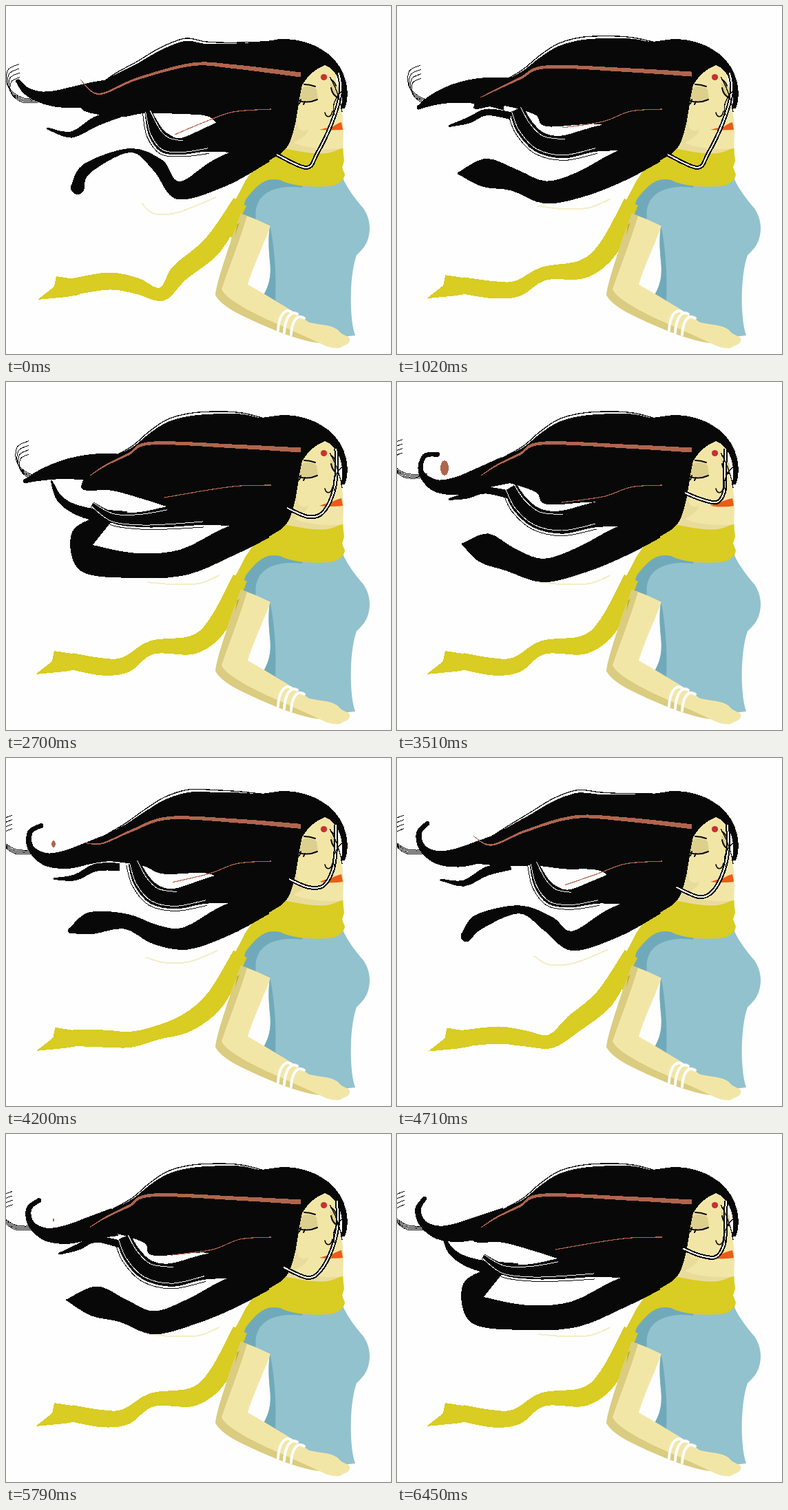
These frames come from a looping animation (559x506 px, 6.55 s). An HTML page:

```html
<!DOCTYPE html>
<html lang="en">
<head>
<meta charset="utf-8">
<title>Hair in the wind</title>
<style>
html, body { margin: 0; width: 100%; height: 100%; overflow: hidden; background: #fefefe; }
svg { display: block; width: 559px; height: 506px; }
.line { fill: none; stroke: #080808; stroke-linecap: round; }
</style>
</head>
<body>
<svg viewBox="0 0 559 506">
  <!-- torso -->
  <path d="M342 304C346 280 354 262 372 252L390 235H488L490 252C496 266 509 283 518 293C526 304 530 318 527 333C525 347 515 357 509 362C501 385 500 420 501 440C502 460 504 470 507 479L490 481L440 462L373 422C381 408 386 395 383 370C381 350 381 335 383 320Z" fill="#91c2ce"/>
  <path d="M342 304C346 280 354 262 372 250L430 255V264C398 260 376 268 367 284C362 293 362 302 363 312Z" fill="#70aaba"/>
  <path d="M383 318C390 350 393 395 391 432L373 422C381 408 386 395 383 370C381 350 381 335 383 320Z" fill="#70aaba"/>
  <!-- face and neck -->
  <path d="M463 84L479 97C481 112 480 133 486 150C490 160 489 170 490 182L489 215L450 220L404 213L418 150L424 105Z" fill="#f2e6a7"/>
  <path d="M424 158C419 174 427 187 439 179C437 190 425 194 418 199C435 207 470 210 490 207L489 217L404 214Z" fill="#e9dc9b"/>
  <path d="M430 118Q444 115 451 121L453 136Q439 141 426 135ZM470 112L483 118V133Q474 128 470 112Z" fill="#ddcf8d"/>
  <g class="line" stroke-width="2">
    <path d="M433 114Q441 114 449 117M472 107Q477 110 479 116"/>
    <path d="M426 138Q439 142 452 136M428 136L426 142M434 139L432 143M472 119Q474 130 482 133"/>
    <path d="M463 155C465 163 472 163 474 153" stroke-width="1.6"/>
  </g>
  <circle cx="461.500" cy="103.500" r="4.600" fill="#c9302b"/>
  <path id="lips" fill="#ec5a17"/>
  <!-- scarf -->
  <path d="M384 204C412 208 445 217 466 214C478 212 484 207 489 207L491 225L488 235L492 245C490 256 480 261 468 262C445 264 415 262 398 253C376 248 364 262 353 275C344 284 342 300 338 318L330 341L315 318C325 295 337 276 347 255C358 238 370 222 384 204Z" fill="#d9cc22"/>
  <g shape-rendering="crispEdges" fill="#d9cc22"><path id="scarf"/><path id="scarfEnd"/></g>
  <!-- arm and bangles -->
  <path d="M341 302Q360 308 384 320C375 345 359 378 351 405L377 420L410 440L440 460C456 464 472 463 482 471C489 481 501 479 499 486C499 493 489 493 485 497C475 499 465 495 455 490C425 487 380 468 345 451C328 443 310 432 304 420C306 402 319 365 327 340Z" fill="#f2e6a7"/>
  <path d="M341 302L350 305C338 345 322 385 313 412C320 428 365 450 400 465L440 483L455 490C425 487 380 468 345 451C328 443 310 432 304 420C306 402 319 365 327 340Z" fill="#dacc80"/>
  <path d="M339 315L333 333L335 318Z" fill="#c2b32a"/>
  <path d="M395 472C396 450 405 439 414 445M404 475C405 453 414 442 423 448M414 478C415 458 423 447 433 454" fill="none" stroke="#fefefe" stroke-width="4" stroke-linecap="round"/>
  <g id="hair" shape-rendering="crispEdges"></g>
</svg>
<script>
const INK = '#080808', BROWN = '#b0654d', PAPER = '#fefefe';

// The wind over time: sway moves every lock, curl rolls the tip, fall drops the fringe.
const WIND = [
  { at: 0, sway: 0, curl: 0.4, fall: 1 },
  { at: 1020, sway: 0.7, curl: 0, fall: 1 },
  { at: 2700, sway: 1, curl: 0.05, fall: 0.4 },
  { at: 3510, sway: 0.78, curl: 1, fall: 0 },
  { at: 4710, sway: 0.15, curl: 0.8, fall: 0.5 },
  { at: 5790, sway: 0.75, curl: 0.85, fall: 0.6 },
  { at: 6450, sway: 1, curl: 0.75, fall: 0.1 }
];

const shape = (text, n = 2) => {
  const v = text.split(' ').map(Number);
  return Array.from({ length: v.length / n }, (_, i) => v.slice(i * n, i * n + n));
};

// Key shapes for rest, gust and full gust; the last one holds.
const CROWN = [
  shape('375 52 325 55 290 55 260 51 225 64 190 84 160 99 130 118'),
  shape('375 53 345 47 315 46 270 49 235 58 208 75 180 97 130 122')
];
const UNDER = [
  shape('110 150 165 161 200 156 250 157 300 164'),
  shape('112 149 150 143 200 158 214 177 300 174'),
  shape('110 155 155 158 205 172 250 185 310 190')
];
const LOW = [
  shape('375 210 36 310 243 42 250 268 26 221 232 20 180 210 6 118 236 16 104 264 20', 3),
  shape('375 210 36 325 232 44 270 258 38 215 275 34 170 258 34 128 243 44 88 241 2', 3),
  shape('375 210 36 322 233 42 258 262 38 190 267 36 118 256 42 112 226 36 150 196 14', 3)
];
const MID = [
  shape('340 185 60 290 195 34 255 204 24 232 200 28 217 183 22 206 153 10', 3),
  shape('335 188 44 285 194 36 240 205 34 205 198 30 182 175 27 170 150 22', 3),
  shape('335 185 50 285 190 36 235 196 30 195 200 22 155 197 16 125 178 8', 3)
];
const SIDE = [
  shape('165 156 12 130 168 14 95 187 9 60 178 3', 3),
  shape('165 160 11 130 153 9 105 164 9 78 174 3', 3),
  shape('175 198 20 115 190 16 80 172 10 66 144 3', 3)
];
const SHINE = [
  shape('428 100 330 88 270 85 190 106 135 128 108 107'),
  shape('428 99 340 94 212 89 178 105 145 121 122 136')
];
const GLINT = [
  shape('385 150 330 154 290 168 245 187'),
  shape('385 150 340 153 300 168 240 176'),
  shape('385 150 340 151 300 156 230 168')
];
const SCARF = [
  shape('340 285 300 348 252 388 226 419 190 407 150 400 98 408'),
  shape('340 285 308 352 272 382 212 386 174 411 140 414 95 406')
];
const WISP = [
  shape('197 287 215 302 250 300 305 278'),
  shape('205 291 240 294 280 293 310 281')
];
const FRINGE = [
  shape('477 97 476 135 475 160 464 175 440 170 418 161'),
  shape('483 97 486 125 473 170 452 214 436 235 393 216')
];
const NAPE = shape('322 208 372 226 398 212 415 185 422 140 420 90 410 50');
const SCARF_W = [22, 29, 27, 20, 23, 25, 24];
const SCARF_TIP = shape('-25 -15 -28 0 -52 19 -10 15');

const $ = id => document.getElementById(id);
const set = (node, d) => node.setAttribute('d', d);
const lerp = (a, b, u) => a + (b - a) * u;
const fix = v => v.toFixed(1);
const mixShapes = (a, b, u) => a.map((p, i) => p.map((v, k) => lerp(v, b[i][k], u)));

function pose(keys, sway) {
  const u = Math.min(keys.length - 1, sway < 0.75 ? sway / 0.75 : 1 + (sway - 0.75) * 4);
  const i = Math.min(keys.length - 2, Math.floor(u));
  return mixShapes(keys[i], keys[i + 1], u - i);
}

function spline(p, closed, start = 'M') {
  const n = p.length;
  const at = i => closed ? p[(i + n) % n] : p[Math.max(0, Math.min(n - 1, i))];
  let d = start + fix(p[0][0]) + ' ' + fix(p[0][1]);
  for (let i = 0; i < (closed ? n : n - 1); i++) {
    const [a, b, c, e] = [at(i - 1), at(i), at(i + 1), at(i + 2)];
    const q = [0, 1].map(k => b[k] + (c[k] - a[k]) / 6);
    const r = [0, 1].map(k => c[k] - (e[k] - b[k]) / 6);
    d += 'C' + [...q, ...r, c[0], c[1]].map(fix).join(' ');
  }
  return d + (closed ? 'Z' : '');
}

// Runs beside the centre line; k = 0.5 is the edge.
function beside(p, k, extra = 0) {
  return p.map(([x, y, w], i) => {
    const a = p[Math.max(0, i - 1)], b = p[Math.min(p.length - 1, i + 1)];
    const dx = b[0] - a[0], dy = b[1] - a[1], len = Math.hypot(dx, dy) || 1;
    const off = w * k + extra;
    return [x - dy / len * off, y + dx / len * off];
  });
}

const oval = (x, y, rx, ry) => `M${x - rx} ${y}a${rx} ${ry} 0 1 0 ${2 * rx} 0a${rx} ${ry} 0 1 0 ${-2 * rx} 0Z`;

function ribbon(p, cap) {
  const d = spline(beside(p, 0.5)) + spline(beside(p, -0.5).reverse(), false, 'L') + 'Z';
  const [x, y, w] = p[p.length - 1];
  return cap ? d + oval(x, y, w / 2, w / 2) : d;
}

// Walks from a point, turning a little at each step; curl rolls the walk upwards.
function walk(x, y, curl, scale = 1, first = 0) {
  const path = [[x, y]];
  for (let i = first; i < 6; i++) {
    const rolled = 162 + 190 * (Math.max(0, i - 1) / 4) ** 1.6;
    const angle = lerp(188 - 8 * i, rolled, curl) * Math.PI / 180;
    const len = lerp(28 - 2.5 * i, 40 - 4.2 * i, curl) * scale;
    x += Math.cos(angle) * len;
    y += Math.sin(angle) * len;
    path.push([x, y]);
  }
  return path;
}

function add(fill, stroke = 'none', width = 0) {
  const p = document.createElementNS('http://www.w3.org/2000/svg', 'path');
  const attrs = { fill, stroke, 'stroke-width': width, 'stroke-linejoin': 'round' };
  for (const k in attrs) p.setAttribute(k, attrs[k]);
  $('hair').append(p);
  return p;
}

const el = {
  wisp: add('none', '#f4edc6', 2),
  strands: add('none', INK, 1),
  body: add(INK), head: add(INK),
  side: add(INK), mid: add(INK), low: add(INK), tail: add(INK),
  edge: add('none', INK, 1.3),
  loose: add('none', INK, 1),
  gaps: add('none', PAPER, 1),
  shine: add(BROWN),
  glint: add('none', BROWN, 1.2),
  spot: add(BROWN),
  fringe: add('none', INK, 6),
  part: add('none', PAPER, 2),
  wisps: add('none', INK, 1.3)
};
set(el.head, 'M360 54C385 50 395 48 408 48C445 50 478 69 490 99C497 117 498 135 492 149L486 149C490 135 489 118 482 104C476 94 470 88 463 86C448 91 436 104 430 115C424 140 423 165 416 187C410 207 402 215 385 222L372 227L365 215Z');
set(el.wisps, 'M470 103Q484 126 488 154M491 120Q470 140 477 158');

function drawScarf(sway) {
  const s = pose(SCARF, sway).map((p, i) => [...p, SCARF_W[i]]);
  const [x, y, w] = s[s.length - 1];
  const tip = SCARF_TIP.map(([dx, dy]) => [x + dx, y + dy]);
  set($('scarf'), ribbon(s));
  set($('scarfEnd'), 'M' + [[x + 8, y - w / 2 + 2], ...tip, [x + 8, y + w / 2]].join('L') + 'Z');
}

function drawTail(curl) {
  const taper = i => lerp(48 - 7 * i, Math.max(3, 40 - 9 * i) + (i > 1 ? 4 : 0), curl);
  const t = walk(158, 128, curl).map((p, i) => [...p, taper(i)]);
  set(el.tail, ribbon(t, true));
  const [x, y] = t[4];
  const strands = [0, 1, 2, 3].map(j => spline(walk(x + 3 * j, y + 9 - 2 * j, 0.9, 0.75 + 0.09 * j, 2)));
  set(el.strands, strands.join(''));
  const spot = Math.max(0, curl - 0.8) * 5;
  set(el.spot, oval(69, 125, 6 * spot, 11 * spot));
}

function draw(time) {
  let k = 0;
  while (k < WIND.length - 2 && time >= WIND[k + 1].at) k++;
  const a = WIND[k], b = WIND[k + 1];
  const u = Math.min(1, (time - a.at) / (b.at - a.at));
  const [sway, curl, fall] = ['sway', 'curl', 'fall'].map(n => lerp(a[n], b[n], u));

  drawScarf(sway);
  drawTail(curl);

  const crown = pose(CROWN, sway), mid = pose(MID, sway);
  set(el.body, spline([...crown, ...pose(UNDER, sway), ...NAPE], true));
  set(el.edge, spline(crown.map(([x, y], i) => [x, y - 4 * Math.sin(Math.PI * i / 7)])));
  set(el.mid, ribbon(mid));
  set(el.low, ribbon(pose(LOW, sway), true));
  set(el.side, ribbon(pose(SIDE, sway), true));
  set(el.loose, spline(beside(mid.slice(1), -0.5, -3)));
  set(el.gaps, spline(beside(mid.slice(1), -0.36)) + spline(beside(mid.slice(2), 0.34)));
  set(el.shine, ribbon(pose(SHINE, sway).map((p, i) => [...p, 7 - 1.2 * i])));
  set(el.glint, spline(pose(GLINT, sway)));
  set(el.wisp, spline(pose(WISP, sway)));

  const fringe = spline(mixShapes(...FRINGE, fall));
  set(el.fringe, fringe);
  set(el.part, fringe);
  const full = 1 - 0.7 * fall;
  set($('lips'), `M455 180Q464 ${178 - 2 * full} 474 ${177 - 4 * full}Q482 170 487 169L489 180Q472 ${180 + 3 * full} 455 180Z`);
}

// first change, last change, number of changes
const RUNS = [[150, 1140, 8], [1260, 2280, 8], [2430, 3390, 8], [3510, 4440, 8], [4560, 5520, 8], [5640, 6450, 7]];
const starts = [0];
for (const [a, b, n] of RUNS)
  for (let i = 0; i < n; i++) starts.push(Math.floor(lerp(a, b, i / (n - 1)) / 10) * 10);

let shown = -1;
function tick(now) {
  const time = now % 6550;
  let step = starts.length - 1;
  while (starts[step] > time) step--;
  if (step !== shown) draw(starts[shown = step]);
  requestAnimationFrame(tick);
}
tick(performance.now());
</script>
</body>
</html>
```
